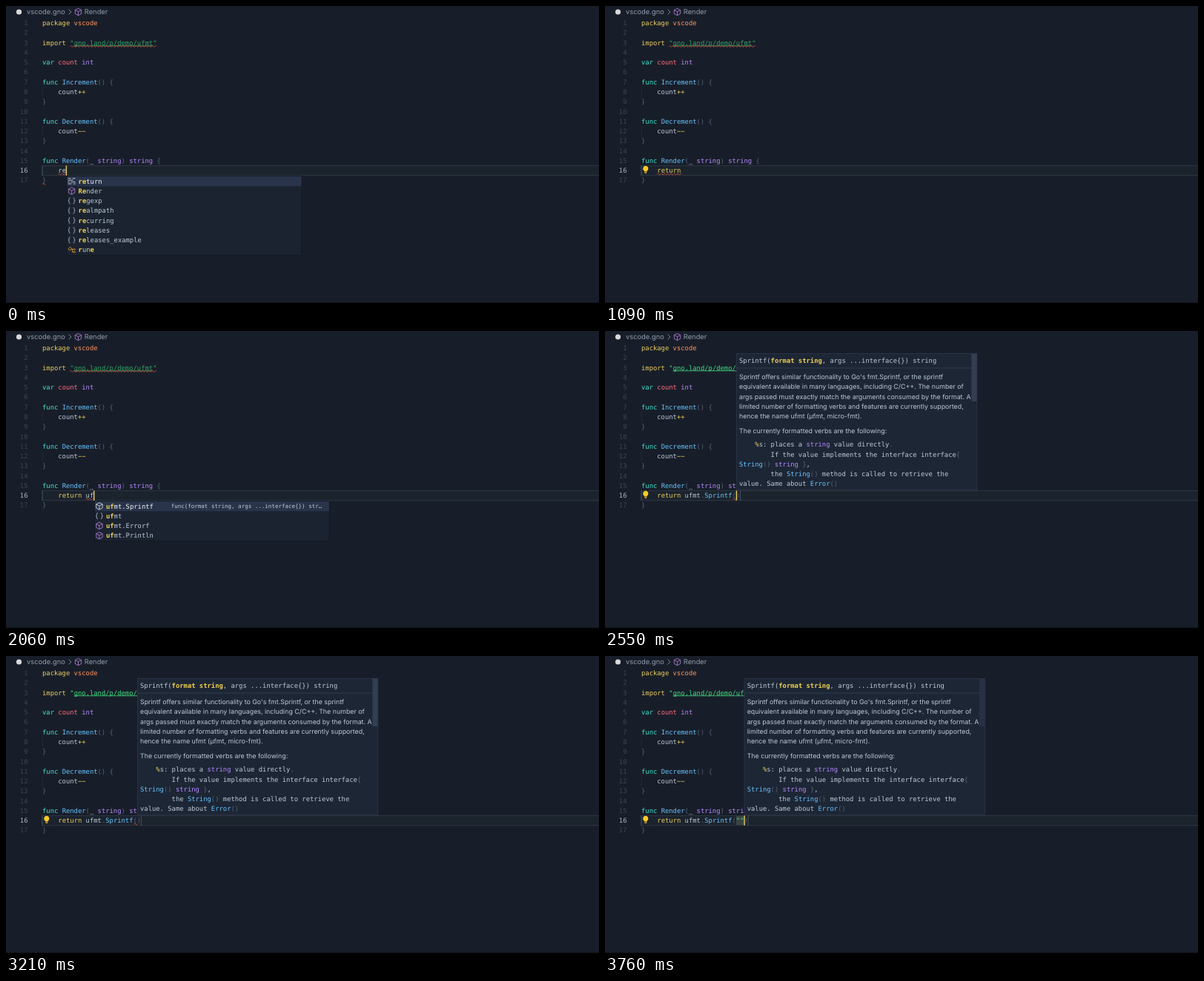
An HTML page for the animation above (3.79 s loop, 800 by 401 pixels).

```html
<!DOCTYPE html>
<html lang="en">
<head>
<meta charset="utf-8">
<title>Editor completion</title>
<style>
  html, body { margin: 0; width: 100%; height: 100%; overflow: hidden; background: #181e29; }
  svg { display: block; width: 800px; height: 401px; }
  text { font: 8.858px "DejaVu Sans Mono", monospace; white-space: pre; text-rendering: geometricPrecision; fill: #bccad8; }
  .ui { font: 8.84px Inter, sans-serif; }
  .crumb { font: 9.35px Inter, sans-serif; fill: #8f9bac; }
  .num { text-anchor: end; fill: #3b4554; }
  .num.on { fill: #a9b6c6; }
  .detail { font-size: 7.53px; }
  .y { fill: #eacd61; } .Y { fill: #f0d050; font-weight: bold; }
  .o { fill: #ff955c; } .t { fill: #3fe4d2; } .b { fill: #69c3ff; }
  .r { fill: #ff6b7d; } .p { fill: #b78aff; } .g { fill: #3fdc80; }
  .d { fill: #566274; } .w { fill: #bccad8; } .W { fill: #f2f6fa; }
  .icon { fill: none; stroke-width: .85; stroke-linejoin: round; }
  .wave { fill: none; stroke: #e8553a; stroke-width: .8; }
</style>
</head>
<body>
<svg viewBox="0 0 800 401">
  <rect width="800" height="401" fill="#181e29"/>
  <rect y="400" width="800" height="1" fill="#10141c"/>
  <g id="base"></g>
  <g id="live"></g>
</svg>
<script>
const LOOP = 3790, CW = 5.333, LH = 13.28, BASE = 9.7;
const col = c => 49 + c * CW;
const lineY = n => 16.3 + (n - 1) * LH;

// Markup: runs split by "|", each led by its colour class.
const runs = s => s.split('|').map(r => `<tspan class="${r[0]}">${r.slice(1)}</tspan>`).join('');
const text = (x, y, body, cls = '') => `<text x="${x}" y="${y}" class="${cls}">${body}</text>`;
const code = (n, c, s) => text(col(c), lineY(n) + BASE, runs(s));
const rect = (x, y, w, h, fill, more = '') =>
  `<rect x="${x}" y="${y}" width="${w}" height="${h}" fill="${fill}" ${more}/>`;

const ICONS = {
  cube: ['#b180d7', 'M0-4.6 4.2-2.5V2.4L0 4.7-4.2 2.4V-2.5ZM-4.2-2.5 0-.3 4.2-2.5M0-.3V4.7'],
  mod: ['#a9b6c6', 'M-2-4q-1.5 0-1.5 1.5v1.2q0 1.3-1.2 1.3 1.2 0 1.2 1.3v1.2q0 1.5 1.5 1.5' +
    'M2-4q1.5 0 1.5 1.5v1.2q0 1.3 1.2 1.3-1.2 0-1.2 1.3v1.2q0 1.5-1.5 1.5'],
  word: ['#a9b6c6', 'M-5-3.6h4M1-3.6h4M-5-1.2h7M-5 1.2h2M-1 1.2h6M-5 3.6h5M2 3.6h3'],
  type: ['#ee9d28', 'M-4.7-1.2l2.8-2.8 2 2-2.8 2.8zM-1-.8h4M1-.8V2.8h2M2.6-.8l1.2-1.2 1.2 1.2-1.2 1.2z' +
    'M2.6 2.8l1.2-1.2 1.2 1.2L3.8 4z']
};
const icon = (kind, x, y, tint) =>
  `<path class="icon" transform="translate(${x} ${y})" stroke="${tint || ICONS[kind][0]}" d="${ICONS[kind][1]}"/>`;

const wave = (n, a, b) => {
  const k = Math.round((b - a) * CW / 2.2);
  return `<path class="wave" d="M${col(a)} ${lineY(n) + 11.6}q1.1-1.9 2.2 0${'t2.2 0'.repeat(k - 1)}"/>`;
};

const SOURCE = {
  1: 'ypackage |ovscode', 3: 'yimport ', 5: 'tvar |rcount |pint',
  7: 'tfunc |bIncrement|d() {', 8: 'w    count|y++', 9: 'd}',
  11: 'tfunc |bDecrement|d() {', 12: 'w    count|y−−', 13: 'd}',
  15: 'tfunc |bRender|d(|W_ |pstring|d) |pstring |d{', 17: 'd}'
};

function drawBase() {
  let s = '<circle cx="17.5" cy="8" r="3.6" fill="#d9d9d9"/>' +
    text(28, 11.4, 'vscode.gno', 'crumb') +
    '<path class="icon" stroke="#8f9bac" d="M84.5 4.6 88 8l-3.5 3.4"/>' +
    icon('cube', 97.5, 8) + text(105.8, 11.4, 'Render', 'crumb');
  s += rect(48.5, 215.7, 760, 13.1, '#1b232d', 'stroke="#323d48" stroke-width=".8"');
  for (const n of [8, 12, 16]) s += rect(48.8, lineY(n), .8, LH, n === 16 ? '#38525c' : '#28313d');
  for (let n = 1; n <= 17; n++) {
    s += text(29.5, lineY(n) + BASE, n, n === 16 ? 'num on' : 'num');
    if (SOURCE[n]) s += code(n, 0, SOURCE[n]);
  }
  return s;
}

// Completion lists: "kind label"
const WORDS = ['word return', 'cube Render', 'mod regexp', 'mod realmpath', 'mod recurring',
  'mod releases', 'mod releases_example', 'type rune'];
const U_WORDS = ['mod ufmt', 'mod uassert', 'type uint', 'type uint16', 'type uint32', 'type uint64',
  'type uint8', 'mod urequire', 'mod users', 'cube ufmt.Errorf', 'cube ufmt.Println', 'cube ufmt.Sprintf'];
const FMT = ['cube ufmt.Sprintf', 'mod ufmt', 'cube ufmt.Errorf', 'cube ufmt.Println'];

// Marks the typed letters in order; null when they do not all occur.
function match(label, typed, plain) {
  let i = 0;
  const out = [...label].map(ch =>
    ch.toLowerCase() === typed[i] ? (i++, 'Y' + ch) : plain + ch);
  return i === typed.length ? runs(out.join('|')) : null;
}

function menu(items, typed, x) {
  const rows = items.map(it => it.split(' ')).filter(([, label]) => match(label, typed, 'w'));
  const y0 = 229.8;
  let s = rect(x, y0, 317, rows.length * LH + .8, '#1b2330', 'stroke="#121720" stroke-width=".8"') +
    rect(x + .4, y0 + .2, 316.2, LH, '#29344a');
  rows.forEach(([kind, label], i) => {
    const y = y0 + i * LH + 6.6;
    s += icon(kind, x + 6.6, y, i ? '' : '#d5dde6') +
      text(x + 15.6, y + 3.1, match(label, typed, i ? 'w' : 'W'));
  });
  if (rows[0][1] === 'ufmt.Sprintf')
    s += text(x + 103.3, y0 + 9.3, 'func(format string, args ...interface{}) str…', 'detail');
  return s;
}

const PROSE = [
  "Sprintf offers similar functionality to Go's fmt.Sprintf, or the sprintf",
  'equivalent available in many languages, including C/C++. The number of',
  'args passed must exactly match the arguments consumed by the format. A',
  'limited number of formatting verbs and features are currently supported,',
  'hence the name ufmt (µfmt, micro-fmt).'
];
const VERBS = [
  'w    |y%|ws: places a |pstring|w value directly|d.',
  'w        If the value implements the interface interface|d{',
  'bString|d() |pstring |d}|w,',
  'w        the |bString|d()|w method is called to retrieve the',
  'wvalue. Same about |bError|d()'
];

function help(x, slider) {
  const tx = x + 3;
  let s = rect(x - .6, 30.4, 324.4, 183.8, '#1d2635', 'stroke="#2c374a" stroke-width=".8"') +
    rect(x - .6, 49.6, 317, .8, '#344054') +
    rect(x + 316.4, 30.6, 7.2, 64.4, slider) +
    text(tx, 42.9, runs('wSprintf(|Yformat string|w, args ...interface{}) string'));
  PROSE.forEach((p, i) => s += text(tx, 65.2 + i * LH, p, 'ui'));
  s += text(tx, 137.5, 'The currently formatted verbs are the following:', 'ui');
  VERBS.forEach((v, i) => s += text(tx, 156.3 + i * LH, runs(v)));
  return s;
}

const BULB = '<g transform="translate(54.8 221)"><path fill="#ffca28" ' +
  'd="M0-5.2a3.6 3.6 0 0 1 2 6.6V2.6H-2V1.4a3.6 3.6 0 0 1 2-6.6Z"/>' +
  '<path fill="#c9a227" d="M-1.7 3.2h3.4v1L.8 5H-.8l-.9-.8Z"/></g>';

// Each step changes part of the state; "key" marks a keystroke.
const CALL = 'yreturn |wufmt|d.|bSprintf|d(';
const STEPS = [
  { t: 0, key: 1, line: 'wre', at: 6, list: WORDS, typed: 're', err: [4, 6], brace: 1, unused: 1 },
  { t: 120, key: 1, line: 'wret', at: 7, typed: 'ret', err: [4, 7] },
  { t: 230, key: 1, line: 'wretu', at: 8, typed: 'retu', err: [4, 8] },
  { t: 340, key: 1, line: 'wretur', at: 9, typed: 'retur', err: [4, 9] },
  { t: 480, key: 1, line: 'yreturn', at: 10, list: null, err: [4, 10], brace: 0 },
  { t: 700, bulb: 1 },
  { t: 1300, key: 1, line: 'yreturn ', at: 11, bulb: 0 },
  { t: 1500, key: 1, line: 'yreturn |wu', at: 12, err: null },
  { t: 1600, list: U_WORDS, typed: 'u', err: [11, 12] },
  { t: 1850, key: 1, line: 'yreturn |wuf', at: 13, list: FMT, typed: 'uf', err: [11, 13] },
  { t: 2390, key: 1, line: CALL + ')', at: 24, list: null, err: null, stop: 25 },
  { t: 2450, help: 1, slider: '#333e51', unused: 0, err: [23.2, 24.2] },
  { t: 2500, bulb: 1 },
  { t: 3480, key: 1, line: CALL + '|g""|d)', at: 25, stop: 27, quotes: 1, err: null, slider: '#273142' },
  { t: 3600, key: 1, at: 26 }
];

function stateAt(t) {
  const s = {};
  for (const step of STEPS) {
    if (step.t > t) break;
    Object.assign(s, step);
    if (step.key) s.last = step.t;
  }
  s.caret = (t - s.last) % 1000 < 500;
  return s;
}

function drawLive(s) {
  const x = col(s.at), y = lineY(16);
  let out = `<g opacity="${s.unused ? .68 : 1}">` + code(3, 7, 'g"gno.land/p/demo/ufmt"') +
    rect(col(8), 53.4, 20 * CW, .8, '#3fdc80') + '</g>';
  if (s.unused) out += wave(3, 7, 29);
  if (s.quotes) out += rect(col(24), y + .6, 2 * CW, 12, '#3a4443');
  out += code(16, 4, s.line);
  if (s.stop) out += rect(col(s.stop) - .2, y, .8, LH, '#525e69');
  if (s.err) out += wave(16, ...s.err);
  if (s.brace) out += wave(17, 0, 1);
  if (s.bulb) out += BULB;
  if (s.caret) out += rect(x - .3, y, 1.4, LH, '#eacd61');
  if (s.list) out += menu(s.list, s.typed, x + 1);
  if (s.help) out += help(x + 1, s.slider);
  return out;
}

const live = document.getElementById('live');
document.getElementById('base').innerHTML = drawBase();
let shown = '';
function tick() {
  const s = stateAt(performance.now() % LOOP), id = s.t + ':' + s.caret;
  if (id !== shown) {
    live.innerHTML = drawLive(s);
    shown = id;
  }
  requestAnimationFrame(tick);
}
tick();
</script>
</body>
</html>
```
